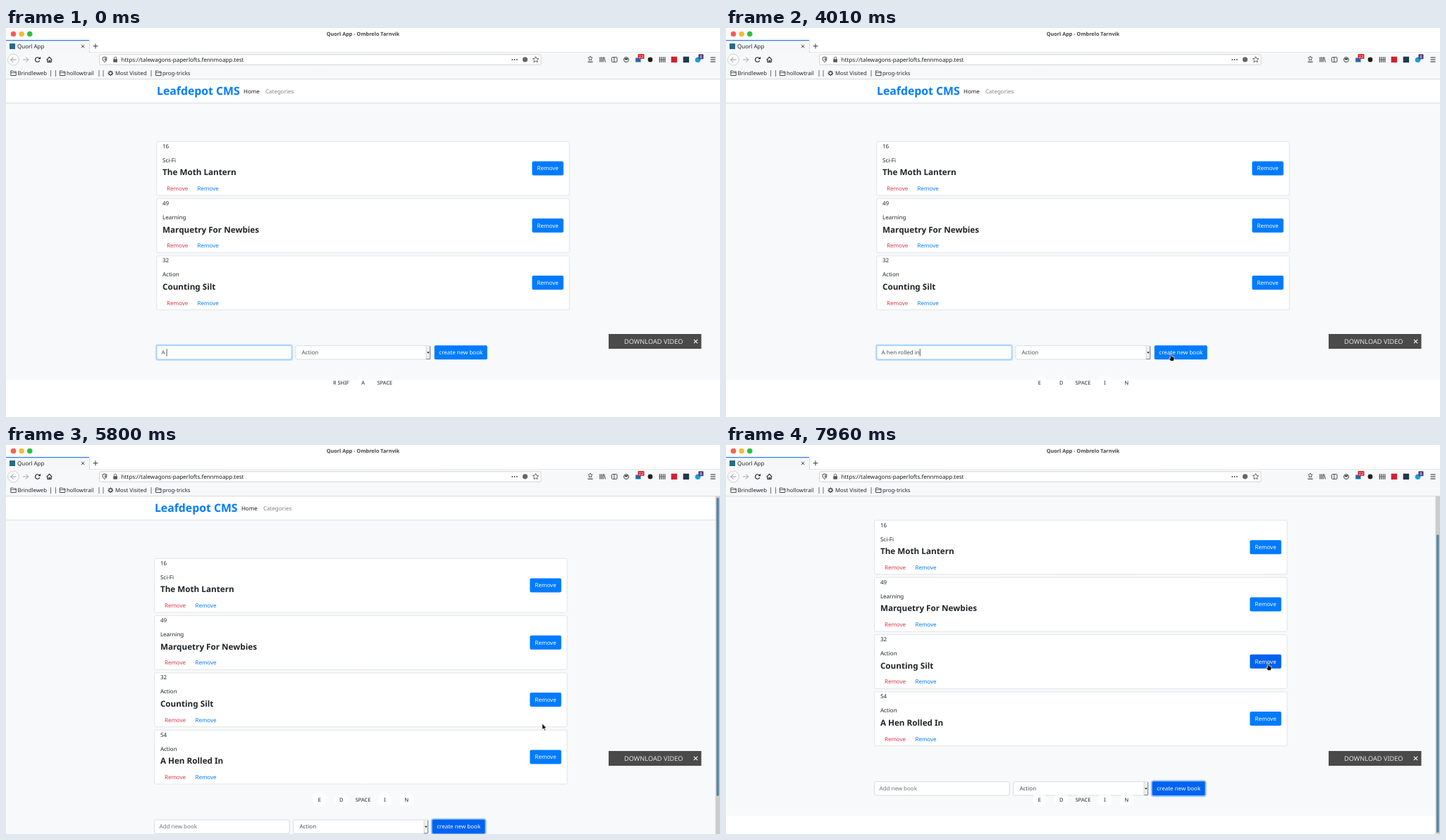
An HTML page with a canvas for the animation above (8000 ms loop, 1013x553 px).

```html
<!DOCTYPE html>
<html lang="en">
<head>
<meta charset="utf-8">
<style>
html, body { margin: 0; width: 100%; height: 100%; overflow: hidden; background: #fff; }
canvas { display: block; }
</style>
</head>
<body>
<canvas id="stage" width="1013" height="553"></canvas>
<script>
const g = document.getElementById('stage').getContext('2d');
const LOOP = 8000, BLUE = '#007bff', PRESSED = '#0062f0', INK = '#212529', ICON = '#3b3b3f';
const TITLE = 'A hen rolled in';
const keyTimes = [470, 670, 870, 1080, 1270, 1460, 1640, 1850, 2040, 2140, 2230, 2420, 2620];
const books = [
  [16, 'Sci-Fi', 'The Moth Lantern'],
  [49, 'Learning', 'Marquetry For Newbies'],
  [32, 'Action', 'Counting Silt'],
  [54, 'Action', 'A Hen Rolled In']
];
// time, x, y of the pointer tip
const path = [
  [3510, 302, 461], [3760, 460, 476], [4010, 631, 463], [4280, 635, 464], [4880, 636, 465],
  [5080, 648, 466], [5620, 782, 442], [5710, 782, 442], [5890, 740, 351], [6570, 740, 351],
  [6730, 808, 337], [6890, 808, 337], [7130, 782, 303], [7350, 746, 302], [7630, 769, 310]
];

// y is the middle of the capitals
function text(s, x, y, size = 8, color = INK, weight = 400, align = 'left') {
  g.font = `${weight} ${size}px "Noto Sans", sans-serif`;
  g.textAlign = align;
  g.fillStyle = color;
  g.fillText(s, x, y + size * 0.357);
}
function rect(x, y, w, h, color) {
  g.fillStyle = color;
  g.fillRect(x, y, w, h);
}
function box(x, y, w, h, r, fill, stroke, width = 1) {
  g.beginPath();
  g.roundRect(x, y, w, h, r);
  if (fill) { g.fillStyle = fill; g.fill(); }
  if (stroke) { g.strokeStyle = stroke; g.lineWidth = width; g.stroke(); }
}
function disc(x, y, r, fill, stroke, width = 1) {
  box(x - r, y - r, 2 * r, 2 * r, r, fill, stroke, width);
}
function trace(points) {
  g.beginPath();
  for (let i = 0; i < points.length; i += 2) g.lineTo(points[i], points[i + 1]);
}
function line(points, color = ICON, width = 1) {
  trace(points);
  g.strokeStyle = color;
  g.lineWidth = width;
  g.stroke();
}
function shape(points, fill, stroke) {
  trace(points);
  g.closePath();
  g.fillStyle = fill;
  g.fill();
  if (stroke) { g.strokeStyle = stroke; g.lineWidth = 0.7; g.stroke(); }
}
function cross(x, y, r, color, width) {
  line([x - r, y - r, x + r, y + r], color, width);
  line([x + r, y - r, x - r, y + r], color, width);
}
function star(x, y, r) {
  const p = [];
  for (let i = 0; i <= 10; i++) {
    const a = i * Math.PI / 5 - Math.PI / 2, d = i % 2 ? r * 0.5 : r;
    p.push(x + d * Math.cos(a), y + d * Math.sin(a));
  }
  line(p, ICON, 0.8);
}
function button(x, y, w, label, color) {
  box(x, y, w, 20, 2, color);
  text(label, x + w / 2, y + 10, 8, '#fff', 400, 'center');
}
function folder(x) {
  line([x, 67.5, x, 61, x + 3, 61, x + 4, 62, x + 7.5, 62, x + 7.5, 67.5, x, 67.5], ICON, 0.9);
  line([x, 63.6, x + 7.5, 63.6], ICON, 0.7);
}
function arrowIcon(x, dir, color) {
  line([x - 4 * dir, 45, x + 4 * dir, 45], color);
  line([x, 41.5, x + 4 * dir, 45, x, 48.5], color);
}

function chrome() {
  rect(0, 0, 1013, 35, '#fff');
  rect(0, 35, 1013, 38, '#f7f8f9');
  rect(0, 17, 118, 18, '#f6f7f8');
  rect(118, 34.4, 895, 0.6, '#d4d5d8');
  rect(0, 17, 118, 1.2, '#2a7ae8');
  rect(118, 18, 0.7, 17, '#d0d1d4');
  rect(0, 72.4, 1013, 0.8, '#d2d3d6');
  ['#f75f57', '#f9b93c', '#2fc042'].forEach((c, i) => disc(10.5 + i * 11.6, 8.5, 3.8, c));
  text('Quorl App - Ombrelo Tarnvik', 506.5, 8.5, 7.3, '#454545', 600, 'center');
  box(5, 22, 8, 8, 0, '#2c6a86');
  text('Quorl App', 16, 26);
  cross(109, 26, 2.2, ICON, 0.9);
  line([123.5, 25.8, 130.5, 25.8], ICON);
  line([127, 22.3, 127, 29.3], ICON);

  disc(10.5, 45, 8, '#fafafa', '#c5c6c9', 0.8);
  arrowIcon(10.5, -1, '#9b9b9f');
  arrowIcon(28, 1, '#a6a6aa');
  g.beginPath();
  g.arc(44.7, 45, 3.2, 0.4, 5.4);
  g.strokeStyle = '#222';
  g.lineWidth = 1.2;
  g.stroke();
  shape([45.5, 44.2, 49, 44.2, 49, 40.7], '#222');
  line([57.6, 45.3, 61.5, 41.4, 65.4, 45.3], '#222', 1.2);
  line([59, 45, 59, 48.5, 64, 48.5, 64, 45], '#222', 1.2);
  rect(60.8, 45.5, 1.6, 3, '#222');

  box(132.5, 37.8, 626.5, 14.4, 2, '#fff', '#c9cacd', 0.8);
  line([137, 42, 140, 41, 143, 42, 142.4, 46, 140, 48.8, 137.6, 46, 137, 42], ICON, 0.9);
  rect(139.8, 42.5, 2, 4, '#77777b');
  rect(152.3, 44.3, 5.6, 4.4, '#55555a');
  box(153.4, 41.2, 3.4, 5, 1.7, null, '#55555a', 0.9);
  text('https://talewagons-paperlofts.fennmoapp.test', 163.5, 45, 8, '#18181a');
  [718.3, 721.6, 724.9].forEach(x => disc(x, 45, 0.9, ICON));
  disc(736.5, 44.8, 3.6, '#66666a');
  star(751.5, 45, 4.4);

  star(829, 43.2, 3.3);
  line([825.5, 48.2, 832.5, 48.2], ICON, 1.2);
  [842.8, 845, 847.2].forEach(x => line([x, 41.3, x, 48.6], ICON, 1.1));
  line([848.6, 41.5, 850.3, 48.6], ICON, 1);
  box(859.4, 41.6, 7.6, 6.8, 1, null, ICON, 0.9);
  line([862.8, 41.6, 862.8, 48.4], ICON, 0.9);
  disc(880, 45, 3.5, null, ICON, 1);
  rect(878, 43, 4, 2.2, ICON);
  box(893.2, 42.5, 7.4, 6, 0.5, '#2468ae');
  box(896.5, 37, 9, 7, 1, '#d8202c');
  text('22', 901, 40.5, 6, '#fff', 400, 'center');
  disc(914, 45, 3.4, '#222');
  for (let i = 0; i < 4; i++) line([927.3 + i * 2.5, 41, 927.3 + i * 2.5, 49], ICON, 1.1);
  line([926.8, 45, 935.4, 45], ICON, 0.6);
  rect(943.7, 40.7, 8.4, 8.4, '#d3202c');
  rect(960.7, 40.7, 8.4, 8.4, '#22384a');
  disc(981.5, 45.2, 3.8, '#159fe0');
  box(982.5, 37.2, 7, 7, 1, '#4b3478');
  text('8', 986, 40.7, 6, '#fff', 400, 'center');
  [42, 45, 48].forEach(y => line([999.5, y, 1006.5, y], '#222', 1));

  folder(6.8);
  text('Brindleweb', 16.5, 64.5, 7.8);
  folder(76.3);
  text('hollowtrail', 86, 64.5, 7.8);
  [63.5, 70.5, 132, 138, 206].forEach(x => line([x, 60, x, 69], '#4a4a4e', 0.8));
  disc(148.3, 64.3, 2.4, null, ICON, 1.2);
  for (let i = 0; i < 8; i++) {
    const c = Math.cos(i * Math.PI / 4), s = Math.sin(i * Math.PI / 4);
    line([148.3 + 2.6 * c, 64.3 + 2.6 * s, 148.3 + 4 * c, 64.3 + 4 * s], ICON, 1);
  }
  text('Most Visited', 155, 64.5, 7.8);
  folder(212.5);
  text('prog-tricks', 222, 64.5, 7.8);
}

function card([id, genre, title], top, hover) {
  box(213.8, top + 0.3, 585.4, 76.8, 2, '#fff', '#dcdddf', 0.8);
  text(id, 222, top + 7);
  text(genre, 222, top + 27);
  text(title, 222, top + 44.2, 11.7, INK, 600);
  text('Remove', 228, top + 67.2, 8, '#dc3545');
  text('Remove', 271.5, top + 67.2, 8, BLUE);
  button(746.4, top + 28.5, 44.5, 'Remove', hover ? PRESSED : BLUE);
}

function form(y, typed, t) {
  const pressed = t >= 4280, added = t >= 4380;
  if (!pressed) box(212.8, y - 0.7, 193.4, 21.4, 3, null, '#bfdeff', 2);
  box(213.8, y + 0.3, 191.4, 19.4, 2, '#fff', pressed ? '#ced4da' : '#80bdff', 0.8);
  text(added ? 'Add new book' : typed, 220.5, y + 10, 8, added ? '#6c757d' : '#495057');
  const blink = t >= 320 && t < 470;
  if (!pressed && !blink) rect(220.5 + g.measureText(typed).width, y + 4.8, 0.8, 10.4, '#333');

  box(410.8, y + 0.3, 191.4, 19.4, 2, '#fff', '#ced4da', 0.8);
  text('Action', 419.5, y + 10, 8, '#495057');
  rect(596.2, y + 1, 5.4, 18.4, '#f0f0f0');
  line([596.2, y + 1, 596.2, y + 19], '#c4c4c4', 0.7);
  line([596.2, y + 19.3, 601.7, y + 19.3, 601.7, y + 0.8], '#77797c', 0.9);
  shape([597.2, y + 9.2, 600.8, y + 9.2, 599, y + 11.4], '#111');

  if (pressed) box(606.9, y - 0.9, 76.8, 21.8, 3, null, '#8fc5ff', 2);
  button(607.8, y, 75, 'create new book', pressed ? PRESSED : BLUE);
}

function keys(count) {
  const pressed = ['R SHIFT', 'A', 'SPACE',
    ...[...TITLE.slice(2, 2 + count)].map(c => c === ' ' ? 'SPACE' : c.toUpperCase())].slice(-5);
  pressed.forEach((key, i) => {
    const x = 506.5 + (i - (pressed.length - 1) / 2) * 30.9;
    disc(x, 504, 10.5, 'rgba(255,255,255,.6)');
    g.save();
    g.beginPath();
    g.rect(x - 11.7, 492, 23.4, 24);
    g.clip();
    if (key.length > 5) text(key, x - 11.7, 504.2, 7.4, '#222');
    else text(key, x, 504.2, 7.4, '#222', 400, 'center');
    g.restore();
  });
}

function pointerAt(t) {
  const i = path.findIndex(p => p[0] > t);
  if (i === 0) return path[0].slice(1);
  if (i < 0) return path.at(-1).slice(1);
  const [a, x, y] = path[i - 1], [b, u, v] = path[i], k = (t - a) / (b - a);
  return [x + (u - x) * k, y + (v - y) * k];
}
function pointer(kind, x, y) {
  g.save();
  g.translate(x, y);
  if (kind === 'beam') {
    line([0, -4.5, 0, 4], '#222', 1);
    line([-2, -5, 0, -4.5, 2, -5], '#222', 0.8);
    line([-2, 4.5, 0, 4, 2, 4.5], '#222', 0.8);
  } else if (kind === 'hand') {
    shape([-0.8, 0, 0.9, 0, 1.1, 3.6, 4.8, 4.8, 5, 7.4, 3.9, 10.4, -0.2, 10.4, -2.6, 6.8, -2, 5.8, -0.7, 6.8],
      '#111', '#fff');
  } else {
    shape([0, 0, 0, 8.6, 2, 6.9, 3.3, 10, 4.8, 9.4, 3.5, 6.4, 6, 6.2], '#111', '#fff');
  }
  g.restore();
}

function draw(t) {
  const added = t >= 4380;
  const scroll = t < 6150 ? 0 : t < 6250 ? 28 : 54.3;
  const extra = added ? 81.3 : 0;
  const count = keyTimes.filter(k => k <= t).length;
  const [mx, my] = pointerAt(t);
  const overRemove = t > 6890 && mx > 743 && mx < 788 && my > 298 && my < 318;
  const overCreate = !added && mx > 607 && my > 450;

  rect(0, 0, 1013, 553, '#fff');
  g.save();
  g.translate(added ? -3.1 : 0, -scroll);
  rect(0, 73, 1020, 427.5 + extra, '#f8f9fb');
  rect(0, 73, 1020, 33.5, '#fff');
  rect(0, 106, 1020, 0.9, '#dfe1e4');
  rect(0, 106.9, 1020, 1, '#f1f2f4');
  text('Leafdepot CMS', 214, 89, 15.8, BLUE, 600);
  text('Home', 337, 90, 8, '#191919');
  text('Categories', 368, 90, 8, '#808080');
  books.slice(0, added ? 4 : 3).forEach((b, i) => card(b, 161 + i * 81.3, i === 2 && overRemove));
  form(451.3 + extra, TITLE.slice(0, 2 + count), t);
  g.restore();

  if (added) {
    rect(1006.5, 73, 6.5, 480, '#cdcdcd');
    box(1008, 75 + scroll * 0.96, 3.6, 424, 1.8, '#5a87a6');
  }
  chrome();
  keys(count);
  rect(855, 435, 131.5, 21, '#4a4a4a');
  text('DOWNLOAD VIDEO', 877, 445.6, 9.2, '#e4e4e4', 300);
  cross(978.5, 445.5, 2.6, '#fff', 1.1);
  if (t >= 1080) {
    const kind = overRemove || overCreate ? 'hand' : t < 3600 ? 'beam' : 'arrow';
    pointer(kind, mx, my);
  }
}

g.textRendering = 'geometricPrecision';
const start = performance.now();
function tick() {
  draw((performance.now() - start) % LOOP);
  requestAnimationFrame(tick);
}
tick();
</script>
</body>
</html>
```
